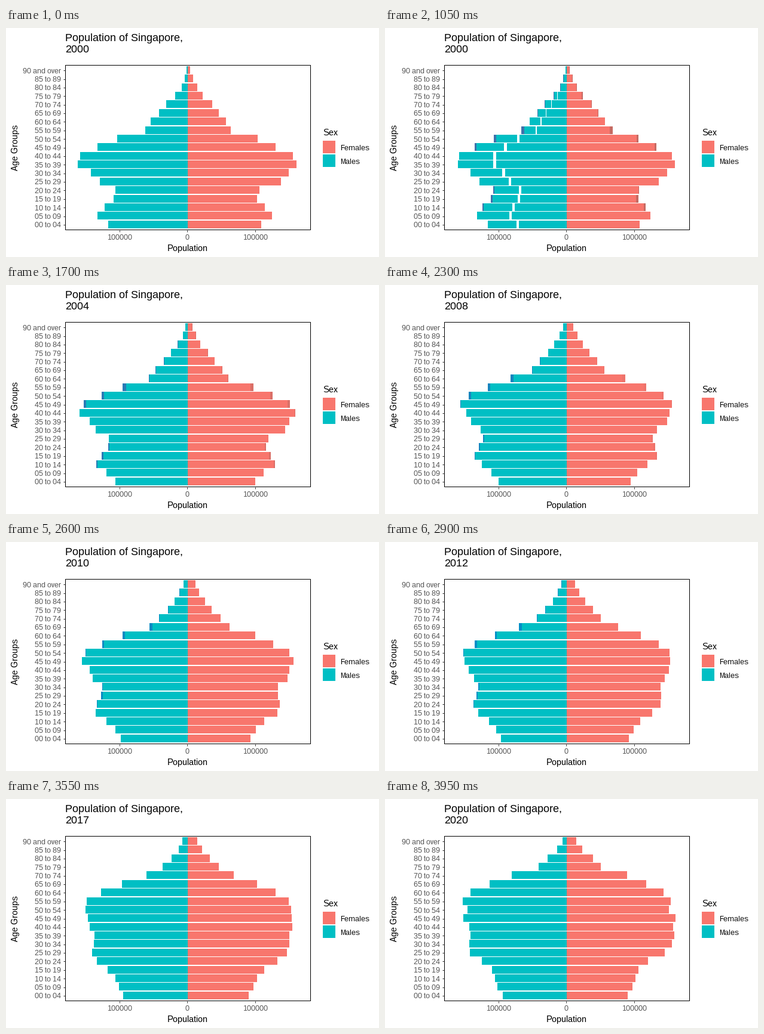
Animation of 624 by 384 pixels, one loop 5000 ms. Source, as a matplotlib script:

```python
import math

import numpy as np
import matplotlib.pyplot as plt
from matplotlib.animation import FuncAnimation
from matplotlib.colors import to_rgb
from matplotlib.patches import Rectangle

W, H, DPI = 624, 384, 100
FRAMES, STEP, PAUSE, MOVES, YEARS = 100, 50, 20, 59, 20
SALMON, TEAL = "#F8766D", "#00BFC4"
LEFT, RIGHT, TOP, BOTTOM = 99, 509, 62, 338
ZERO, ROW, GROUPS = 304, 276 / 19.2, 19
PX = 72 / DPI

plt.rcParams.update({
    "font.family": "Liberation Sans",
    "text.hinting": "native",
    "text.hinting_factor": 1,
})

# Bar lengths in pixels, youngest group first, in the first and last year
MALES = ([133, 151, 139, 124, 121, 147, 162, 184, 180, 151, 118, 71, 62, 48, 36, 21, 10, 5, 2],
         [107, 116, 120, 125, 142, 162, 163, 161, 163, 173, 166, 174, 161, 129, 92, 47, 32, 16, 7])
FEMALES = ([123, 141, 129, 116, 120, 156, 169, 182, 176, 147, 117, 72, 64, 52, 41, 25, 16, 9, 4],
           [102, 110, 115, 120, 136, 164, 176, 180, 178, 182, 171, 174, 162, 133, 101, 57, 44, 26, 16])
AGE = np.arange(GROUPS)

fig = plt.figure(figsize=(W / DPI, H / DPI), dpi=DPI, facecolor="white")
ax = fig.add_axes([0, 0, 1, 1])
ax.set_xlim(0, W)
ax.set_ylim(H, 0)
ax.axis("off")


def label(x, y, s, size, color="black", **kw):
    return ax.text(x, y, s, fontsize=size * PX, color=color, **kw)


def box(x, y, w, h, color):
    return ax.add_patch(Rectangle((x, y), w, h, fc=color, ec="none",
                                  lw=0, antialiased=False))


def line(xs, ys):
    ax.plot(xs, ys, color="#333333", lw=PX, solid_capstyle="butt")


def row_y(age):
    return TOP + (18.6 - age) * ROW


def bar_set(color):
    bars = []
    for age in AGE:
        y = row_y(age) - 0.2
        top, bottom = round(y - 0.45 * ROW), round(y + 0.45 * ROW)
        bars.append(box(ZERO, top, 0, bottom - top, color))
    return bars


def mix(a, b, u):
    u = min(max(u, 0), 1)
    return tuple(p + (q - p) * u for p, q in zip(to_rgb(a), to_rgb(b)))


def lengths(profiles, t):
    """Follow each cohort up the age groups from the first to the last year."""
    first, last = profiles
    born = AGE - t / 5
    # Unborn cohorts start near 0.57 of the youngest; the oldest die out
    start = np.interp(born, [-4, *AGE], [0.57 * first[0], *first])
    end = np.interp(born + 4, [*AGE, GROUPS + 3], [*last, 0])
    return start + (end - start) * t / YEARS


male_tips, male_bars, gaps = bar_set(TEAL), bar_set(TEAL), bar_set("white")
female_tips, female_bars = bar_set(SALMON), bar_set(SALMON)

# Panel and axes
ax.add_patch(Rectangle((LEFT, TOP), RIGHT - LEFT, BOTTOM - TOP,
                       fill=False, ec="black", lw=PX))
for age in AGE:
    y = row_y(age) + 0.5
    name = f"{5 * age:02d} to {5 * age + 4:02d}" if age < 18 else "90 and over"
    label(92.5, round(y + 4.4), name, 12, "#4D4D4D", ha="right")
    line([96, 99], [y, y])
for x, s in [(190, "100000"), (303, "0"), (417, "100000")]:
    label(x + 0.5, 355, s, 12, "#4D4D4D", ha="center")
    line([x, x], [339, 342])
label(304, 374, "Population", 15, ha="center")
label(20, 200.5, "Age Groups", 15, ha="center", va="baseline",
      rotation=90, rotation_mode="anchor")

# Legend
label(530, 180, "Sex", 15)
for y, color, name in [(189, SALMON, "Females"), (212, TEAL, "Males")]:
    box(530, y, 21, 21, color)
    label(559, y + 16, name, 12)

label(99, 22, "Population of Singapore,", 18)
year_text = label(99, 41, "2000", 18)


def place(bars, tips, profiles, t, side, tint):
    """Growing bars keep the year's first length and get a tinted tip."""
    year = math.floor(t + 1e-9)
    now, first = lengths(profiles, t), lengths(profiles, year)
    late = lengths(profiles, year + 2 / 3) if t - year > 1e-6 else now
    for bar, tip, n, f, l in zip(bars, tips, now, first, late):
        solid, full = (round(f), round(l)) if l > f else (round(n), round(n))
        bar.set_width(side * solid)
        tip.set_x(ZERO + side * solid)
        tip.set_width(side * (full - solid))
        tip.set_facecolor(tint)
    return now


def draw(frame):
    step = min(max(frame - PAUSE, 0), MOVES)
    # Three steps a year; the last year takes two
    t = step / 3 if step <= 57 else 19 + (step - 57) / 2
    males = place(male_bars, male_tips, MALES, t, -1,
                  mix("#4070AA", "#0090C8", t / 13))
    place(female_bars, female_tips, FEMALES, t, 1,
          mix("#C46A62", SALMON, t / 11))

    # Stacked male parts come apart briefly in the first year
    part = (3 - step) / 2 if 0 < step < 3 else 0
    for age, gap, length in zip(AGE, gaps, males):
        gap.set_x(round(ZERO - length * (0.635 + 0.006 * age)))
        gap.set_width(round(0.03 * length * part))

    year_text.set_text(str(2000 + YEARS * step // MOVES))
    return []


anim = FuncAnimation(fig, draw, frames=FRAMES, interval=STEP,
                     init_func=lambda: draw(0), repeat=True, repeat_delay=0,
                     blit=False)
plt.show()
```
